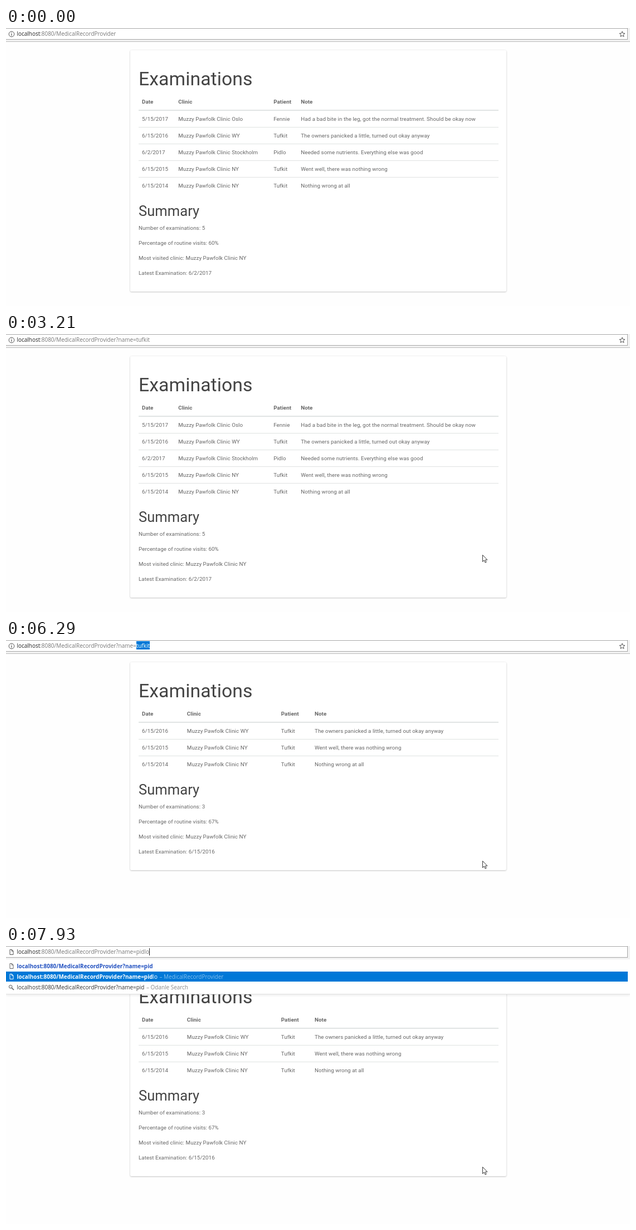
Recreate the animation shown at these times as an HTML page. Size 1120 by 500 pixels, loop 8 s.

```html
<!DOCTYPE html>
<html lang="en">
<head>
<meta charset="utf-8">
<title>Examinations</title>
<style>
html, body { margin: 0; width: 100%; height: 100%; overflow: hidden; background: #fefefe; }
#stage { position: relative; width: 1120px; height: 500px; overflow: hidden; background: #fefefe; }
#stage div, #stage svg { position: absolute; }
svg { display: block; overflow: visible; }

#page, #page svg { left: 0; top: 0; }
.card { left: 223px; top: 40px; width: 675px; background: #fff; border-radius: 2px;
  box-shadow: 0 .75px 2.5px rgba(0, 0, 0, .28); }
#page text { font: 9.75px Roboto, sans-serif; letter-spacing: .075px; fill: #666; }
#page .head { font-weight: 700; }
#page .h2 { font-size: 33.75px; fill: #444; }
#page .h3 { font-size: 25.5px; fill: #444; }

#bar { left: 0; top: 0; width: 1120px; height: 24px; background: #f2f2f2; border-bottom: 1px solid #bcbcbc; }
.field { left: -2px; top: 0; width: 1116px; height: 19px; background: #fff; border: 1px solid #a6a6a6; }
.line { font: 9.95px 'Open Sans', 'Noto Sans', sans-serif; white-space: pre; color: #777; }
#url { left: 19.5px; top: 2px; line-height: 16px; }
.host { color: #222; }
.sel { display: inline-block; color: #fff; background: linear-gradient(#0078d7 0 0) 0 0 / 100% 15px no-repeat; }
.sel .host { color: #fff; }
.caret { display: inline-block; width: 1px; height: 13px; margin: 0 -1px 0 0; background: #222; vertical-align: -3px; }

#menu { left: 0; top: 24px; width: 1120px; height: 62px; background: #fff;
  border-bottom: 1px solid #e2e2e2; box-shadow: 0 2px 4px rgba(0, 0, 0, .08); }
.row { left: 0; width: 1116px; height: 18.7px; line-height: 18.5px; color: #2251c0; }
.row span { position: absolute; left: 19.5px; }
.row i { font-style: normal; color: #888; margin-left: 1px; }
.row.search { color: #333; }
.row.on { background: #0078d7; color: #fff; }
.row.on i { color: #86c0ee; }
</style>
</head>
<body>
<div id="stage">
  <div id="page"></div>
  <div id="bar"><div class="field"></div></div>
  <div id="menu"></div>
  <div id="tools" style="left:0;top:0"></div>
  <div id="url" class="line"></div>
  <svg id="cursor" style="left:0;top:0" width="10" height="16">
    <path d="M.5 .5V12.5L3.2 9.9L5.1 14.2L7.1 13.3L5.2 9.2H8.9Z" fill="#fff" stroke="#222" stroke-width=".9"/>
  </svg>
</div>
<script>
const LOOP = 8000;
const BASE = 'localhost:8080/MedicalRecordProvider';
const NAMED = BASE + '?name=';
const TITLE = 'MedicalRecordProvider';
const CLINIC = 'Muzzy Pawfolk Clinic ';
const $ = id => document.getElementById(id);

const wyVisit = ['6/15/2016', CLINIC + 'WY', 'Tufkit', 'The owners panicked a little, turned out okay anyway'];
const nyVisits = [
  ['6/15/2015', CLINIC + 'NY', 'Tufkit', 'Went well, there was nothing wrong'],
  ['6/15/2014', CLINIC + 'NY', 'Tufkit', 'Nothing wrong at all']
];
const pages = {
  all: {
    columns: [244, 309.2, 480.2, 529.2],
    visits: [
      ['5/15/2017', CLINIC + 'Oslo', 'Fennie', 'Had a bad bite in the leg, got the normal treatment. Should be okay now'],
      wyVisit,
      ['6/2/2017', CLINIC + 'Stockholm', 'Pidlo', 'Needed some nutrients. Everything else was good'],
      ...nyVisits
    ],
    routine: 60, latest: '6/2/2017'
  },
  one: { columns: [244, 324.8, 493.8, 554], visits: [wyVisit, ...nyVisits], routine: 67, latest: '6/15/2016' }
};

const text = (x, y, s, cls = '') => `<text x="${x}" y="${y}" class="${cls}">${s}</text>`;
const rule = (y, h, color) => `<rect x="238" y="${y}" width="646" height="${h}" fill="${color}"/>`;

function pageHtml({ columns, visits, routine, latest }) {
  const cells = (row, y, cls) => row.map((s, i) => text(columns[i], y, s, cls)).join('');
  const end = visits.length * 30;
  const summary = [
    'Number of examinations: ' + visits.length,
    `Percentage of routine visits: ${routine}%`,
    `Most visited clinic: ${CLINIC}NY`,
    'Latest Examination: ' + latest
  ];
  return `<div class="card" style="height:${284 + end}px"></div><svg width="1120" height="500">` +
    text(238, 102.5, 'Examinations', 'h2') +
    cells(['Date', 'Clinic', 'Patient', 'Note'], 136, 'head') +
    rule(147.2, 1.5, '#d8dcdb') +
    visits.map((v, i) => cells(v, 166.8 + i * 30) + (i ? rule(148 + i * 30, 1, '#dfe2e1') : '')).join('') +
    text(238, 188 + end, 'Summary', 'h3') +
    summary.map((s, i) => text(238, 213.4 + end + i * 27, s)).join('') + '</svg>';
}

const icon = (y, body, x = 4) =>
  `<svg style="left:${x}px;top:${y}px" width="12" height="12" fill="none" stroke-width="1">${body}</svg>`;
const fileIcon = (y, color) => icon(y, `<path d="M3 1.5H6.5L9 4V10.5H3ZM6.3 1.5V4.2H9" stroke="${color}"/>`);
const searchIcon = y => icon(y, '<path d="M6 6L10 10" stroke="#555" stroke-width="1.4"/><circle cx="4.2" cy="4.2" r="2.8" stroke="#555"/>');
const infoIcon = icon(4.5, '<circle cx="6" cy="6" r="4.8" stroke="#555"/><path d="M6 5.2V8.8M6 3.2V4.3" stroke="#444" stroke-width="1.1"/>');
const starPoints = Array.from({ length: 10 }, (_, i) => {
  const r = i % 2 ? 2.3 : 5.2, a = i * Math.PI / 5;
  return `${6 + r * Math.sin(a)},${6.3 - r * Math.cos(a)}`;
}).join(' ');
const starIcon = icon(4.5, `<polygon points="${starPoints}" stroke="#555"/>`, 1099.5);

// Square brackets mark selected text, a bar marks the caret.
const urlHtml = s => s
  .replace('localhost', '<span class="host">localhost</span>')
  .replace(/\[(.*)\]/, '<span class="sel">$1</span>')
  .replace('|', '<span class="caret"></span>');

function menuHtml({ typed, rows, on }) {
  const entry = (i, cls, glyph, body) =>
    `<div class="row line ${cls}" style="top:${3 + i * 18.75}px">${glyph}<span>${body}</span></div>`;
  return rows.map((rest, i) => entry(i, i === on ? 'on' : '', fileIcon(3.2, i === on ? '#fff' : '#666'),
    `<b>${typed}</b>${rest}` + (rest ? `<i> – ${TITLE}</i>` : ''))).join('') +
    entry(2, 'search', searchIcon(4), `${typed}<i> – Odanle Search</i>`);
}

const menu = (typed, rows, on = 0) => ({ typed, rows, on });
const pidMenu = menu(NAMED + 'pid', ['', 'lo']);
// Each step: start time, address, page, open suggestions
const steps = [
  [0, BASE, 'all'],
  [1190, `[${BASE}]`, 'all'],
  [1820, BASE + '|', 'all'],
  [2290, BASE + '?[name=tufkit]', 'all', menu(BASE + '?', ['name=tufkit', 'name=pidlo'])],
  [3210, NAMED + 'tufkit', 'all'],
  [3360, NAMED + 'tufkit', ''],
  [3450, NAMED + 'tufkit', 'one'],
  [5500, `[${NAMED}tufkit]`, 'one'],
  [5970, NAMED + 'tufkit|', 'one'],
  [6290, NAMED + '[tufkit]', 'one'],
  [7000, NAMED + 'p|', 'one', menu(NAMED + 'p', ['', 'idlo'])],
  [7060, NAMED + 'pi|', 'one', menu(NAMED + 'pi', ['', 'dlo'])],
  [7230, NAMED + 'pid|', 'one', pidMenu],
  [7760, NAMED + 'pid', 'one', pidMenu],
  [7930, NAMED + 'pidlo|', 'one', { ...pidMenu, on: 1 }]
];
const moves = [[0, -50, -50], [70, 991, 472], [137, 920, 437], [203, 872, 409], [270, 855, 397]];
const at = (list, t) => list.findLast(item => item[0] <= t);

let shown;
function draw(t) {
  const [, x, y] = at(moves, t);
  $('cursor').style.transform = `translate(${x}px, ${y}px)`;
  const step = at(steps, t);
  if (step === shown) return;
  shown = step;
  const [, url, page, open] = step;
  $('page').innerHTML = page ? pageHtml(pages[page]) : '';
  $('url').innerHTML = urlHtml(url);
  $('menu').style.display = open ? 'block' : 'none';
  $('menu').innerHTML = open ? menuHtml(open) : '';
  $('tools').innerHTML = open ? fileIcon(4.5, '#555') : infoIcon + starIcon;
}

const start = performance.now();
function frame() {
  draw((performance.now() - start) % LOOP);
  requestAnimationFrame(frame);
}
frame();
</script>
</body>
</html>
```
